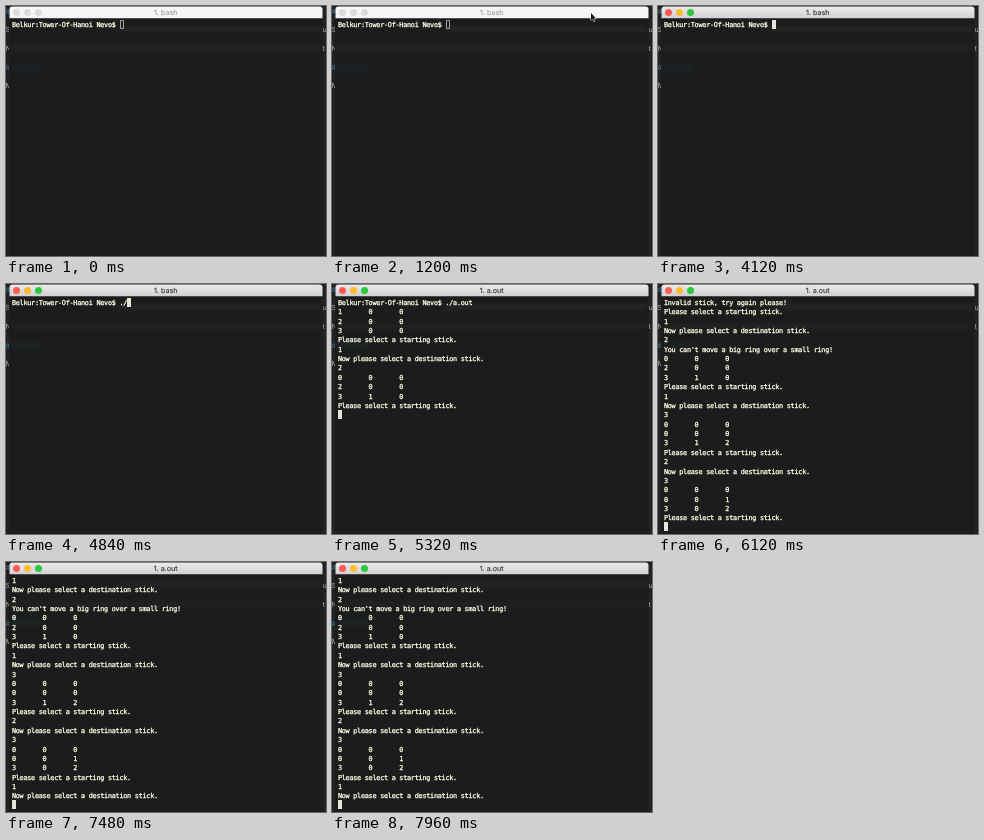
These frames come from a looping animation (320x250 px, 8000 ms). An HTML page with a canvas:

```html
<!DOCTYPE html>
<html lang="en">
<head>
<meta charset="utf-8">
<title>Terminal</title>
<style>
  html, body { margin: 0; width: 100%; height: 100%; overflow: hidden; background: #1c1c1c; }
  canvas { display: block; width: 320px; height: 250px; }
</style>
</head>
<body>
<canvas id="stage"></canvas>
<script>
const LOOP = 8000, ROWS = 25;
const CELL_W = 3.84, CELL_H = 9.37, LEFT = 6, TOP = 14;
const FOCUS = 1760, LAUNCH = 5120;
const MONO = '6.8px "DejaVu Sans Mono", monospace';
const SANS = '7.2px Inter, sans-serif';
const TEXT = '#fffde4';

const canvas = document.getElementById('stage');
const ctx = canvas.getContext('2d');
const ratio = window.devicePixelRatio || 1;
canvas.width = 320 * ratio;
canvas.height = 250 * ratio;
ctx.scale(ratio, ratio);
ctx.textRendering = 'geometricPrecision';

const START = 'Please select a starting stick.\n';
const DEST = 'Now please select a destination stick.\n';
const board = (...rows) =>
  rows.map(row => [...row].join(' '.repeat(7)) + '\n').join('');

// Terminal output: [time, text appended]
const output = [
  [0, 'Belkur:Tower-Of-Hanoi Nevo$ '],
  [4400, '.'], [4600, '/'],
  [4920, 'a.out'],
  [LAUNCH, '\n' + board('100', '200', '300') + START],
  [5200, '1'], [5240, '\n' + DEST],
  [5280, '2'], [5320, '\n' + board('000', '200', '310') + START],
  [5360, '5'], [5400, '\nInvalid stick, try again please!\n' + START],
  [5440, '1'], [5480, '\n' + DEST],
  [5520, '2'], [5560, "\nYou can't move a big ring over a small ring!\n" +
    board('000', '200', '310') + START],
  [5640, '1'], [5680, '\n' + DEST],
  [5720, '3'], [5760, '\n' + board('000', '000', '312') + START],
  [5800, '2'], [5840, '\n' + DEST],
  [5880, '3'], [5920, '\n' + board('000', '001', '302') + START],
  [6840, '1'], [7480, '\n' + DEST]
];

// Pointer path: [time, x, y]
const pointerPath = [
  [880, 323, 34], [1120, 259, 7], [1840, 259, 7], [2400, 323, 38]
];

function rect(x, y, w, h, color) {
  ctx.fillStyle = color;
  ctx.fillRect(x, y, w, h);
}

function label(text, x, y, color, font, { align = 'left', weight = 0 } = {}) {
  ctx.font = font;
  ctx.textAlign = align;
  ctx.fillStyle = ctx.strokeStyle = color;
  ctx.fillText(text, x, y);
  if (weight) {
    ctx.lineWidth = weight;
    ctx.lineJoin = 'round';
    ctx.strokeText(text, x, y);
  }
}

function drawBackdrop() {
  rect(0, 0, 320, 250, '#222');
  [['#', 8, '#3f7088'], ['S', 26, '#aaa'], ['N', 45, '#aaa'],
   ['#', 64, '#3f7088'], ['M', 82, '#aaa']]
    .forEach(([char, y, color]) => label(char, -0.5, y, color, SANS));
  label('u', 316.5, 26, '#aaa', SANS);
  label('t', 316.5, 45, '#aaa', SANS);
}

function drawWindow() {
  rect(3, 12, 313.5, 238, '#1c1c1c');
  ctx.save();
  ctx.beginPath();
  ctx.rect(3, 12, 313.5, 238);
  ctx.clip();
  ctx.filter = `blur(${2 * ratio}px)`;
  rect(112, 20, 204, 6, '#242424');
  rect(4, 39, 312, 6, '#222');
  rect(4, 58, 32, 6, '#1c2326');
  ctx.restore();
}

function drawTitleBar(t) {
  const active = t >= FOCUS;
  const fill = ctx.createLinearGradient(0, 1, 0, 12);
  fill.addColorStop(0, active ? '#ebe9eb' : '#f7f7f7');
  fill.addColorStop(1, active ? '#d2d0d2' : '#f4f4f4');
  ctx.fillStyle = fill;
  ctx.beginPath();
  ctx.roundRect(3.5, 0.5, 313, 11.7, [3, 3, 0, 0]);
  ctx.fill();
  const colors = active ? ['#fb5d55', '#fdbc2f', '#2bc840'] : Array(3).fill('#dcdcdc');
  colors.forEach((color, i) => {
    ctx.fillStyle = color;
    ctx.beginPath();
    ctx.arc(10.5 + i * 11, 6.5, 3.5, 0, 2 * Math.PI);
    ctx.fill();
  });
  label(t < LAUNCH ? '1. bash' : '1. a.out', 159.7, 9.2,
    active ? '#3c3c3c' : '#a4a4a4', SANS, { align: 'center', weight: 0.15 });
}

function drawTerminal(t) {
  const text = output.filter(([time]) => time <= t).map(entry => entry[1]).join('');
  const lines = text.split('\n').slice(-ROWS);
  lines.forEach((line, row) => [...line].forEach((char, col) =>
    label(char, LEFT - 0.1 + col * CELL_W, TOP + 6.9 + row * CELL_H, TEXT, MONO,
      { weight: 0.3 })));

  const row = lines.length - 1;
  const x = Math.round(LEFT + lines[row].length * CELL_W);
  const y = Math.round(TOP + row * CELL_H - 0.4);
  if (t >= FOCUS) {
    rect(x, y, 4, 9, '#e4e4d8');
  } else {
    ctx.strokeStyle = '#c4c4b8';
    ctx.lineWidth = 0.8;
    ctx.strokeRect(x + 0.5, y + 0.5, 3, 8);
  }
}

function drawPointer(t) {
  const next = pointerPath.findIndex(([time]) => time > t);
  if (next < 1) return;
  const [t0, x0, y0] = pointerPath[next - 1];
  const [t1, x1, y1] = pointerPath[next];
  const p = (t - t0) / (t1 - t0);
  const eased = p * p * (3 - 2 * p);
  ctx.save();
  ctx.translate(x0 + (x1 - x0) * eased, y0 + (y1 - y0) * eased);
  const arrow = new Path2D('M0 0V7.2L1.6 5.7L2.7 8.3L4 7.8L2.9 5.2H5Z');
  ctx.strokeStyle = '#fff';
  ctx.lineWidth = 1;
  ctx.stroke(arrow);
  ctx.fillStyle = '#111';
  ctx.fill(arrow);
  ctx.restore();
}

function draw(t) {
  drawBackdrop();
  drawWindow();
  drawTitleBar(t);
  drawTerminal(t);
  drawPointer(t);
}

const began = performance.now();
function tick() {
  draw((performance.now() - began) % LOOP);
  requestAnimationFrame(tick);
}
tick();
</script>
</body>
</html>
```
